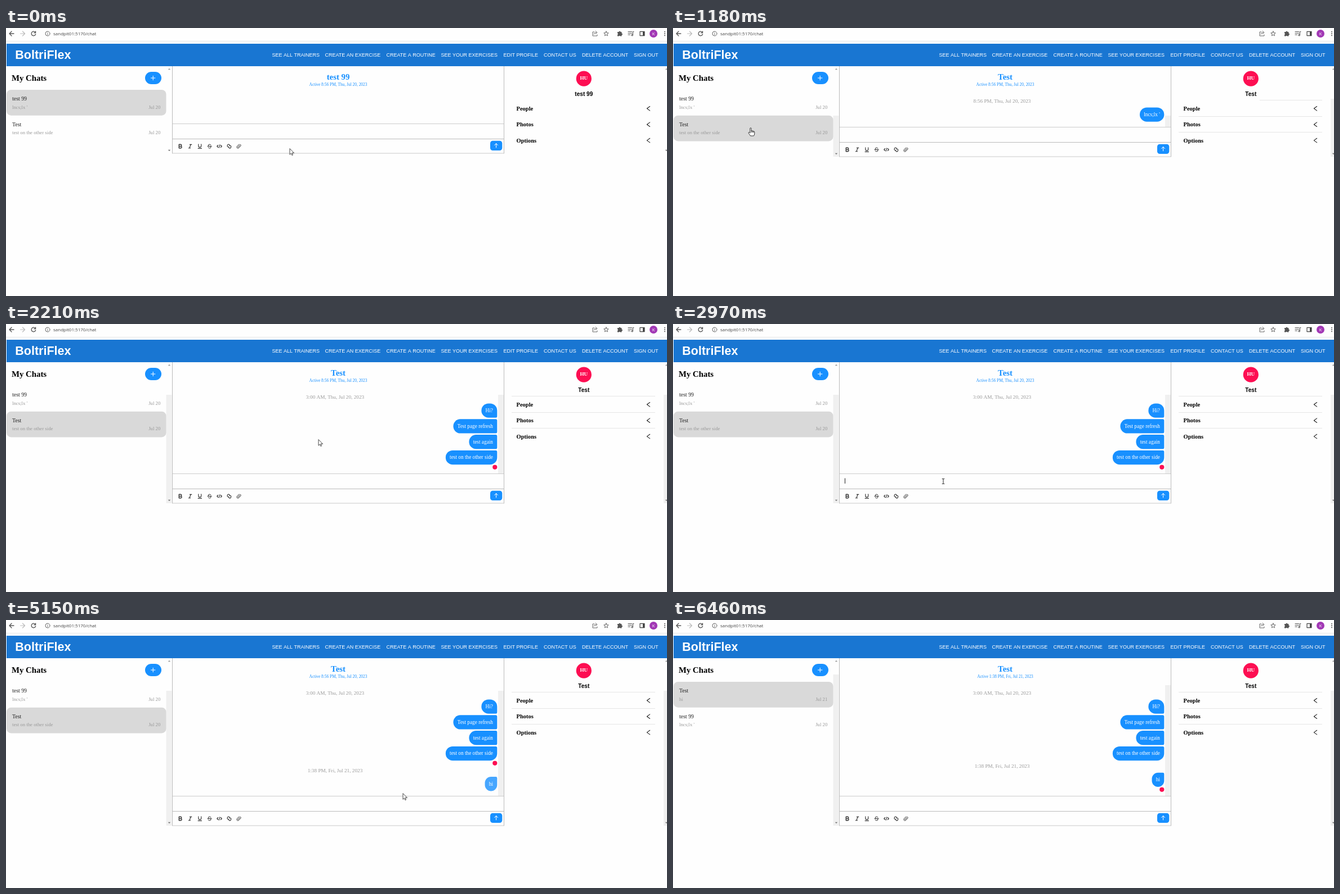
Recreate the animation shown at these times as an HTML page with a canvas. Size 1174 by 477 pixels, loop 6.92 s.

```html
<!DOCTYPE html>
<html lang="en">
<head>
<meta charset="utf-8">
<title>Chat</title>
<style>
  html, body { margin: 0; width: 100%; height: 100%; overflow: hidden; background: #fefefe; }
  canvas { display: block; }
</style>
</head>
<body>
<canvas id="stage" width="1174" height="477"></canvas>
<script>
const ctx = document.getElementById('stage').getContext('2d', { alpha: false });
const LOOP = 6920;
const SERIF = '"Liberation Serif", serif';
const SANS = '"Liberation Sans", sans-serif';
const UI = '"Open Sans", sans-serif';
const BLUE = '#1890ff', GREY = '#999', INK = '#222', RED = '#fd0e52', PAPER = '#fefefe';

// Moments at which the state changes
const LOADED = 300, SWITCHED = 1180, HISTORY = 1630, FOCUS = 2970, BLINK = 3550,
      TYPE_H = 3820, TYPE_I = 3970, BLUR = 4550, SENT = 4850, CONFIRMED = 5430;

// The screen refreshes every 150 ms, counted anew from each of these
const runs = [0, 1180, 2210, 2970, 3550, 3820, 4250, 5280, 6460];

const route = [
  [0, 504, 215], [150, 484, 212], [450, 330, 200], [750, 180, 184], [1050, 138, 178],
  [1180, 138, 178], [1330, 300, 194], [1480, 456, 202], [1930, 545, 206], [2210, 555, 206],
  [2360, 555, 206], [2510, 640, 186], [2660, 600, 230], [2970, 480, 280], [3820, 480, 280],
  [3970, 570, 283], [4250, 827, 301], [4400, 868, 306], [4850, 868, 306], [5000, 800, 308],
  [5150, 705, 309], [5430, 720, 322], [6030, 964, 375], [6180, 1050, 420], [6330, 1130, 462],
  [6460, 1200, 500]
];

function refreshTime(t) {
  const start = runs.filter(r => r <= t).pop();
  return start === 6460 ? start : start + Math.floor((t - start) / 150) * 150;
}

function pointer(t) {
  const i = route.findIndex(k => k[0] > t);
  if (i < 0) return route[route.length - 1].slice(1);
  const [t0, x0, y0] = route[i - 1], [t1, x1, y1] = route[i];
  const p = (t - t0) / (t1 - t0);
  return [x0 + (x1 - x0) * p, y0 + (y1 - y0) * p];
}

function text(s, x, y, size, color, { font = SERIF, weight = '', align = 'left' } = {}) {
  ctx.font = `${weight} ${size}px ${font}`;
  ctx.textAlign = align;
  ctx.fillStyle = color;
  ctx.fillText(s, x, y);
}

function rect(x, y, w, h, color) {
  ctx.fillStyle = color;
  ctx.fillRect(x, y, w, h);
}

function round(x, y, w, h, r, color) {
  ctx.beginPath();
  ctx.roundRect(x, y, w, h, r);
  ctx.fillStyle = color;
  ctx.fill();
}

function disc(x, y, r, color) {
  ctx.beginPath();
  ctx.arc(x, y, r, 0, 7);
  ctx.fillStyle = color;
  ctx.fill();
}

function icon(d, x, y, { stroke, fill, width = 1.2 }) {
  const path = new Path2D(d);
  ctx.save();
  ctx.translate(x, y);
  ctx.lineCap = ctx.lineJoin = 'round';
  ctx.lineWidth = width;
  if (fill) { ctx.fillStyle = fill; ctx.fill(path); }
  if (stroke) { ctx.strokeStyle = stroke; ctx.stroke(path); }
  ctx.restore();
}

function browserBar() {
  const dark = { stroke: '#555', width: 1.3 }, thin = { stroke: '#666', width: 1 };
  icon('M4 0H-4M0 -4L-4 0L0 4', 10, 10, dark);
  icon('M-4 0H4M0 -4L4 0L0 4', 29.5, 10, { stroke: '#bbb', width: 1.2 });
  icon('M3.6 1A3.8 3.8 0 1 1 2.6 -2.7M3.6 -4V-1.3H.9', 49, 10, dark);
  icon('M4 0A4 4 0 1 1 -4 0A4 4 0 1 1 4 0M0 -.2V2M0 -2V-1.9', 74, 10, thin);
  text('sandpit01:5170/chat', 84, 13, 8, '#444', { font: UI });
  icon('M-1 -3H-4V4H4V2M-2 1Q-1 -2 2 -2M1 -4.5L4 -2L1 .5', 1046, 10, thin);
  icon('M0 -4.2L1.2 -1.4L4.2 -1.2L1.9 .8L2.6 3.8L0 2.2L-2.6 3.8L-1.9 .8L-4.2 -1.2L-1.2 -1.4Z', 1066, 10, thin);
  icon('M-4 -3H-1.5A1.5 1.5 0 0 1 1.5 -3H3.5V-.5A1.5 1.5 0 0 1 3.5 2.5V4.5H1A1.5 1.5 0 0 0 -1.5 4.5H-4V2A1.5 1.5 0 0 0 -4 -.8Z', 1090, 10, { fill: '#555' });
  icon('M-5 -3.5H1.5M-5 -.8H1.5M-5 2H-1.5M5 -3.5H3.4V2.5A1.2 1.2 0 1 1 2.4 1.4', 1110, 10, { stroke: '#555', width: 1.1 });
  icon('M-4 -3.6H4V3.6H-4Z', 1130, 10, { stroke: '#444', width: 1.2 });
  rect(1131, 6.4, 3, 7.2, '#444');
  disc(1150, 10, 7, '#a238b5');
  text('K', 1150, 12.8, 7.5, '#fff', { font: UI, align: 'center' });
  for (const y of [6.7, 10, 13.3]) disc(1170, y, 1, '#555');
  rect(0, 23, 1174, 1, '#e9e9e9');
}

function navBar() {
  rect(1, 28, 1173, 40, '#1976d2');
  text('BoltriFlex', 16.3, 55, 21.5, '#fff', { font: SANS, weight: 'bold' });
  const links = [
    ['SEE ALL TRAINERS', 472.5], ['CREATE AN EXERCISE', 566.5], ['CREATE A ROUTINE', 675.5],
    ['SEE YOUR EXERCISES', 772.5], ['EDIT PROFILE', 883.5], ['CONTACT US', 955],
    ['DELETE ACCOUNT', 1023], ['SIGN OUT', 1115]
  ];
  for (const [label, x] of links) text(label, x, 51.2, 9, '#fff', { font: SANS });
}

function scrollBar(x, w, top, bottom) {
  if (top) rect(x, top, w, bottom - top, '#f0f0f0');
}

function scrollArrows(x, bottom) {
  icon('M-2.2 1.2H2.2L0 -1.2Z', x, 73, { fill: '#999' });
  icon('M-2.2 -1.2H2.2L0 1.2Z', x, bottom - 5, { fill: '#777' });
}

function chatList(t) {
  text('My Chats', 10, 93.5, 14.8, '#000', { weight: 'bold' });
  round(247, 78, 29, 22, 11, BLUE);
  icon('M-3.7 0H3.7M0 -3.7V3.7', 261.2, 89, { stroke: '#fff', width: 1 });
  const rows = [['test 99', "lncs;lx '", 'Jul 20'], ['Test', 'test on the other side', 'Jul 20']];
  if (t >= CONFIRMED) rows.unshift(['Test', 'hi', 'Jul 21']), rows.pop();
  const selected = t >= SWITCHED && t < CONFIRMED ? 1 : 0;
  rows.forEach(([name, last, date], i) => {
    const y = 110 + i * 45.7;
    if (i === selected) round(1, y, 283.5, 45.7, 8, '#d9d9d9');
    text(name, 11, y + 18.8, 9.9, INK);
    text(last, 11, y + 33.6, 8.75, GREY);
    text(date, 274.3, y + 33.6, 8.75, GREY, { align: 'right' });
  });
}

function bubble(s, y, corners, color = BLUE) {
  ctx.font = `9.3px ${SERIF}`;
  const w = ctx.measureText(s).width + 14.5;
  round(872.3 - w, y, w, 25.3, corners, color);
  text(s, 865, y + 15.4, 9.3, '#fff', { align: 'right' });
}

function stamp(s, y) {
  text(s, 584.5, y + 3, 9.25, GREY, { align: 'center' });
}

function messages(t) {
  const R = 12.5, r = 2.5;
  if (t < LOADED) return;
  if (t < HISTORY) {
    stamp('8:56 PM, Thu, Jul 20, 2023', 130);
    bubble("lncs;lx '", 141.4, R);
    if (t < SWITCHED) disc(868.3, 171.5, 4.1, RED);
    return;
  }
  stamp('3:00 AM, Thu, Jul 20, 2023', 130);
  ['Hi?', 'Test page refresh', 'test again', 'test on the other side'].forEach((s, i) =>
    bubble(s, 141.4 + i * 27.85, [R, i ? r : R, i < 3 ? r : R, R]));
  const done = t >= CONFIRMED;
  if (t >= SENT) {
    const y = done ? 260.3 : 267.7;
    stamp('1:38 PM, Fri, Jul 21, 2023', y);
    bubble('hi', y + 11.4, [R, r, R, R], done ? BLUE : '#46a6ff');
  }
  disc(868.3, done ? 301.8 : 254.8, 4.1, RED);
}

function chatHeader(t) {
  const when = t < CONFIRMED ? '8:56 PM, Thu, Jul 20, 2023' : '1:38 PM, Fri, Jul 21, 2023';
  text(t < SWITCHED ? 'test 99' : 'Test', 590, 92, 14.8, BLUE, { weight: 'bold', align: 'center' });
  text('Active ' + when, 590, 102.8, 7.4, BLUE, { align: 'center' });
}

function composer(t, top) {
  rect(296, top, 588, 53, PAPER);
  rect(296, top, 588, 1, '#ccc');
  rect(296, top + 27, 588, 1, '#bbb');
  rect(296, top + 52.5, 588, 1, '#ccc');
  const typed = t < TYPE_H || t >= SENT ? '' : t < TYPE_I ? 'h' : 'hi';
  text(typed, 305.2, top + 16, 9, '#111');
  const caretOn = (t >= FOCUS && t < BLINK) || (t >= TYPE_H && t < BLUR);
  if (caretOn) rect(305 + typed.length * 3.5, top + 8.5, 1, 9.5, '#222');

  const y = top + 40.5, pen = { stroke: '#333', width: 1.15 };
  icon('M-2.2 -3.2H.6A1.6 1.6 0 0 1 .6 0H-2.2ZM-2.2 0H1A1.6 1.6 0 0 1 1 3.2H-2.2Z', 309.5, y, { stroke: '#333', width: 1.4 });
  icon('M-.6 -3.2H2.8M-2.8 3.2H.6M1.1 -3.2L-1.1 3.2', 327, y, pen);
  icon('M-2.4 -3.8V-.6A2.4 2.4 0 0 0 2.4 -.6V-3.8M-3.2 3.8H3.2', 344.3, y, pen);
  icon('M2.4 -1.8Q2 -3.4 0 -3.4Q-2.4 -3.4 -2.4 -1.6Q-2.4 0 0 0Q2.4 .2 2.4 1.7Q2.4 3.4 0 3.4Q-2 3.4 -2.5 1.8M-3.7 0H3.7', 361.6, y, { stroke: '#333', width: 1 });
  icon('M-2.3 -2L-4.2 0L-2.3 2M2.3 -2L4.2 0L2.3 2M.7 -2.6L-.7 2.6', 379, y, pen);
  icon('M-.5 1A2 2 0 0 1 -3.4 -.8L-2.7 -2.6A1.8 1.8 0 0 1 .4 -2.6L1.2 -1.2M.5 -1A2 2 0 0 1 3.4 .8L2.7 2.6A1.8 1.8 0 0 1 -.4 2.6L-1.2 1.2', 396.4, y, pen);
  icon('M2.2 -1.2L-.7 2.1A.8 .8 0 0 1 -1.9 .9L1.4 -2.8A1.5 1.5 0 0 1 3.5 -.7L-.2 3.2A2.2 2.2 0 0 1 -3.3 .1L.2 -3.7', 413.5, y, { stroke: '#444', width: .9 });

  round(860, top + 30.7, 21.3, 17.3, 4.5, BLUE);
  icon('M0 3.6V-3.4M-3 -.6L0 -3.6L3 -.6', 870.6, top + 39.2, { stroke: '#fff', width: 1 });
}

function details(t) {
  disc(1026.3, 90.2, 13.6, RED);
  text('HU', 1026.3, 92.2, 9.2, '#fff', { weight: 'bold', align: 'center' });
  text(t < SWITCHED ? 'test 99' : 'Test', 1026.3, 120.6, 10.1, '#000', { font: SANS, weight: 'bold', align: 'center' });
  ['People', 'Photos', 'Options'].forEach((label, i) => {
    const y = 143.3 + i * 28.4;
    text(label, 906.5, y + 3.4, 10.5, '#000', { weight: 'bold' });
    icon('M2.6 -3.8L-2.6 0L2.6 3.8', 1141, y, { stroke: '#222', width: 1.1 });
    if (t < LOADED) return;
    const x = !i && t >= SWITCHED && t < HISTORY ? 1042 : 898;
    rect(x, Math.round(y - 15), 1153 - x, 1, '#e6e6e6');
  });
}

function drawPointer(t, top) {
  const [x, y] = pointer(t);
  const overRow = x < 284 && y > 110 && y < 201;
  const overSend = x > 860 && x < 881 && y > top + 30 && y < top + 48;
  const overInput = x > 296 && x < 884 && y > top && y < top + 27;
  if (overRow || overSend) {
    icon('M-1.2 7V.8A1.1 1.1 0 0 1 1 .8V5Q2.2 4.2 3 5.4Q4.2 4.8 5 6Q6.8 5.6 6.8 7.4V10Q6.8 12 5.4 14H-.4Q-1.6 12 -3.8 9.2Q-4.4 7.6 -2.8 7.4L-1.2 8.8ZM1 5V7.6M3 5.4V7.8M5 6V8', x, y, { fill: '#fff', stroke: '#222', width: .9 });
  } else if (overInput) {
    icon('M-1.8 -4.5H-.5L0 -4L.5 -4.5H1.8M0 -4V4M-1.8 4.5H-.5L0 4L.5 4.5H1.8', x, y, { stroke: '#222', width: 1 });
  } else {
    icon('M0 0V10.3L2.4 8.1L4 11.6L5.6 10.9L4 7.4H7.2Z', x, y, { fill: '#fff', stroke: '#333', width: .9 });
  }
}

function composerTop(t) {
  if (t < LOADED) return 170;
  if (t < SWITCHED) return 183;
  if (t < HISTORY) return 176;
  return t < SENT ? 266 : 313;
}

function draw(t) {
  const top = composerTop(t), bottom = top + 53;
  const loaded = t >= LOADED, switching = t >= SWITCHED && t < HISTORY, done = t >= CONFIRMED;
  rect(0, 0, 1174, 477, PAPER);
  browserBar();
  navBar();
  scrollBar(284.5, 10, loaded && (done ? 97 : switching ? 156 : 126), bottom);
  scrollBar(874, 10, loaded && (done ? 116 : switching ? 156 : 126), top);
  scrollBar(1168, 6, loaded && 126, bottom);
  scrollArrows(290, bottom);
  scrollArrows(1173, bottom);
  chatList(t);
  chatHeader(t);
  messages(t);
  composer(t, top);
  details(t);
  rect(295, 68, 1, bottom - 67.5, '#bbb');
  rect(884, 68, 1, bottom - 67.5, '#bbb');
  drawPointer(t, top);
}

function tick() {
  draw(refreshTime(performance.now() % LOOP));
  requestAnimationFrame(tick);
}
tick();
</script>
</body>
</html>
```
